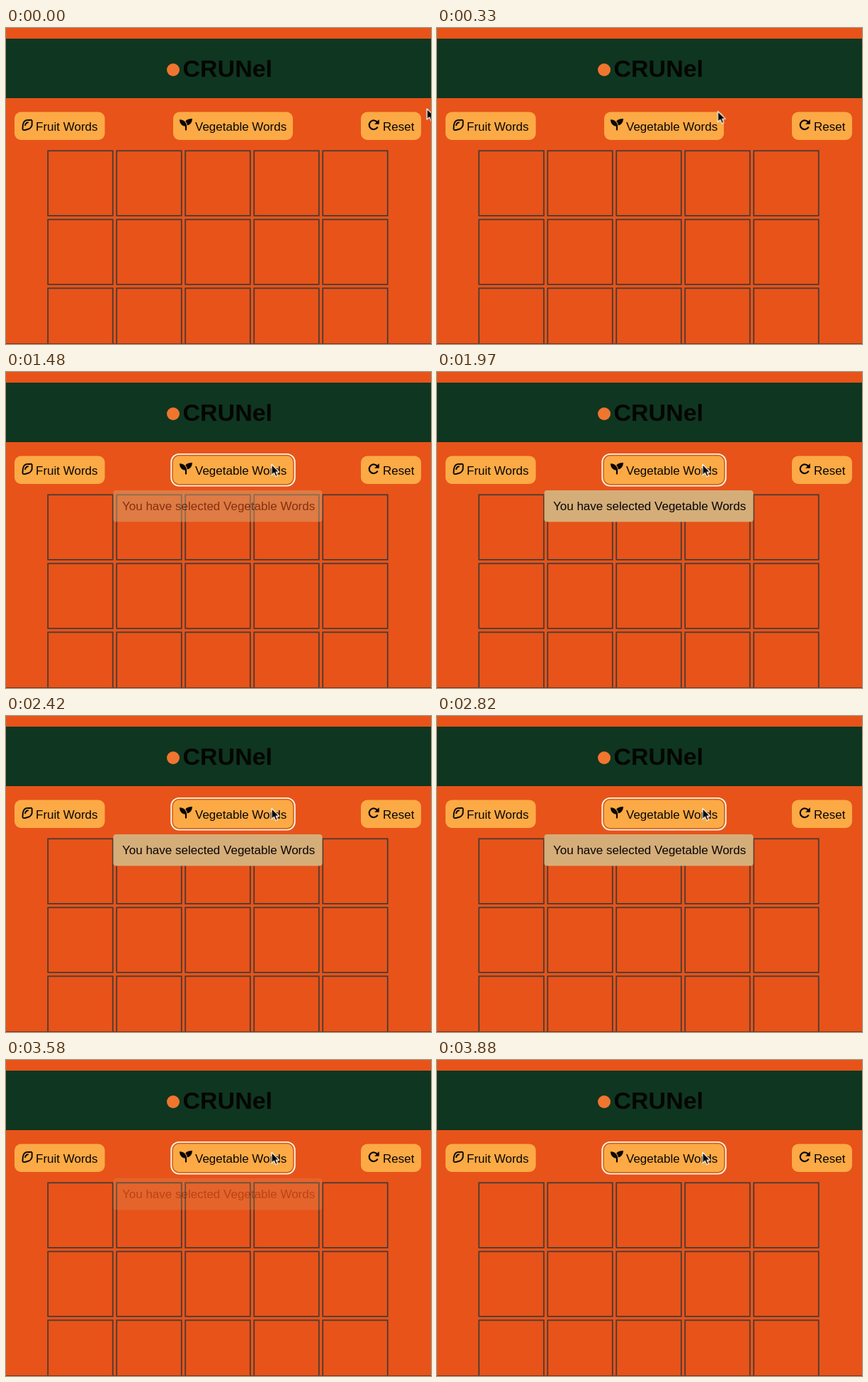
Recreate the animation shown at these times as an HTML page. Size 600 by 446 pixels, loop 3970 ms.

```html
<!DOCTYPE html>
<html lang="en">
<head>
<meta charset="utf-8">
<title>Word game</title>
<style>
  html, body { margin: 0; width: 100%; height: 100%; overflow: hidden; background: #e8531a; }
  svg { display: block; width: 600px; height: 446px; }
  text { font: 17px "Liberation Sans", Arial, sans-serif; fill: #080604; }
  .title { font-size: 34px; font-weight: bold; fill: #040604; }
  .btn { fill: #fcaa45; }
  .cell { fill: none; stroke: #493c33; stroke-width: 1.8; }
  .line { fill: none; stroke: #080604; stroke-width: 1.9; stroke-linecap: round; stroke-linejoin: round; }
  .ring, .toast, .cursor { animation: 3970ms linear infinite; }
  .ring { animation-name: focus; animation-timing-function: step-end; }
  .toast { animation-name: toast; }
  .cursor { animation-name: move; }

  /* press at 1300 ms */
  @keyframes focus {
    0% { opacity: 0; }
    32.74%, 100% { opacity: 1; }
  }
  /* in 1370-1620 ms, out 3380-3630 ms */
  @keyframes toast {
    0%, 34.51% { opacity: 0; }
    40.81%, 85.14% { opacity: 1; }
    91.44%, 100% { opacity: 0; }
  }
  @keyframes move {
    0% { transform: translate(595px, 114px); animation-timing-function: cubic-bezier(.3, .3, .55, .95); }
    8.31% { transform: translate(396.5px, 117.5px); animation-timing-function: cubic-bezier(.3, .3, .5, 1); }
    20.15%, 100% { transform: translate(375px, 130.5px); }
  }
</style>
</head>
<body>
<svg viewBox="0 0 600 446">
  <rect width="600" height="446" fill="#e8531a"/>
  <rect y="15" width="600" height="84" fill="#0f3620"/>
  <circle cx="236" cy="59" r="9" fill="#f0752f"/>
  <text class="title" x="249.5" y="69">CRUNel</text>

  <g id="grid"></g>
  <rect y="445" width="600" height="1" fill="#70391f"/>

  <rect class="btn" x="12" y="118.5" width="127.5" height="39.5" rx="9"/>
  <path class="line" d="M24.5 134.5C25.5 131 29 129.3 32 130C34 130.4 34.6 129.2 36 130C37.6 131.2 36.3 132.4 36.7 134.5C37.3 138.5 34.5 142.5 30.5 143C28 143.4 26.6 144.8 24.4 143.9C22.3 142.7 23.9 141 23.7 139C23.6 137.4 24 136 24.5 134.5Z"/>
  <path class="line" stroke-width="1.4" d="M27 137.2C27.5 135 29 133.7 31 133.3"/>
  <text x="42" y="145">Fruit Words</text>

  <rect class="btn" x="236" y="118.5" width="169" height="39.5" rx="9"/>
  <g class="ring">
    <rect x="235" y="117.5" width="171" height="41.5" rx="9.5" fill="#fcaa45" stroke="#d2651b" stroke-width="2"/>
    <rect x="233.3" y="115.9" width="174.4" height="44.7" rx="11" fill="none" stroke="#fff4e8" stroke-width="1.9"/>
  </g>
  <path d="M245 129.2C250.5 128.9 254.9 132.8 255.1 138.3V143.8Q254 145.6 252.9 143.8V138.6C248.3 138.4 245 134.4 245 129.2ZM263 128C263 133 260.1 136.8 255.9 137.4C255.6 135 254.6 133 253.3 131.6C254.9 129.2 258.4 127.9 263 128Z" fill="#080604"/>
  <text x="267" y="145">Vegetable Words</text>

  <rect class="btn" x="501" y="118.5" width="85" height="39.5" rx="9"/>
  <path class="line" style="stroke-width:2.2" d="M524.3 133.2A6.3 6.3 0 1 0 524.2 140.4"/>
  <path d="M526.8 129.1V135.7H520.2Z" fill="#080604"/>
  <text x="532" y="145">Reset</text>

  <g class="toast">
    <rect x="151.5" y="167" width="295" height="44.5" rx="4" fill="#d5ad79"/>
    <text x="164" y="195">You have selected Vegetable Words</text>
  </g>

  <path class="cursor" d="M0 0V15L3.4 11.8L5.8 17.1L8.4 16L6.1 10.8H10.8Z" fill="#050505" stroke="#fff" stroke-width="1.1" stroke-linejoin="round"/>
</svg>
<script>
  const grid = document.getElementById("grid");
  const pitch = 97, size = 91.6;
  for (let row = 0; row < 3; row++) {
    for (let col = 0; col < 5; col++) {
      const cell = document.createElementNS(grid.namespaceURI, "rect");
      const box = { class: "cell", x: 59.2 + col * pitch, y: 173.3 + row * pitch, width: size, height: size };
      for (const key in box) cell.setAttribute(key, box[key]);
      grid.append(cell);
    }
  }
</script>
</body>
</html>
```
